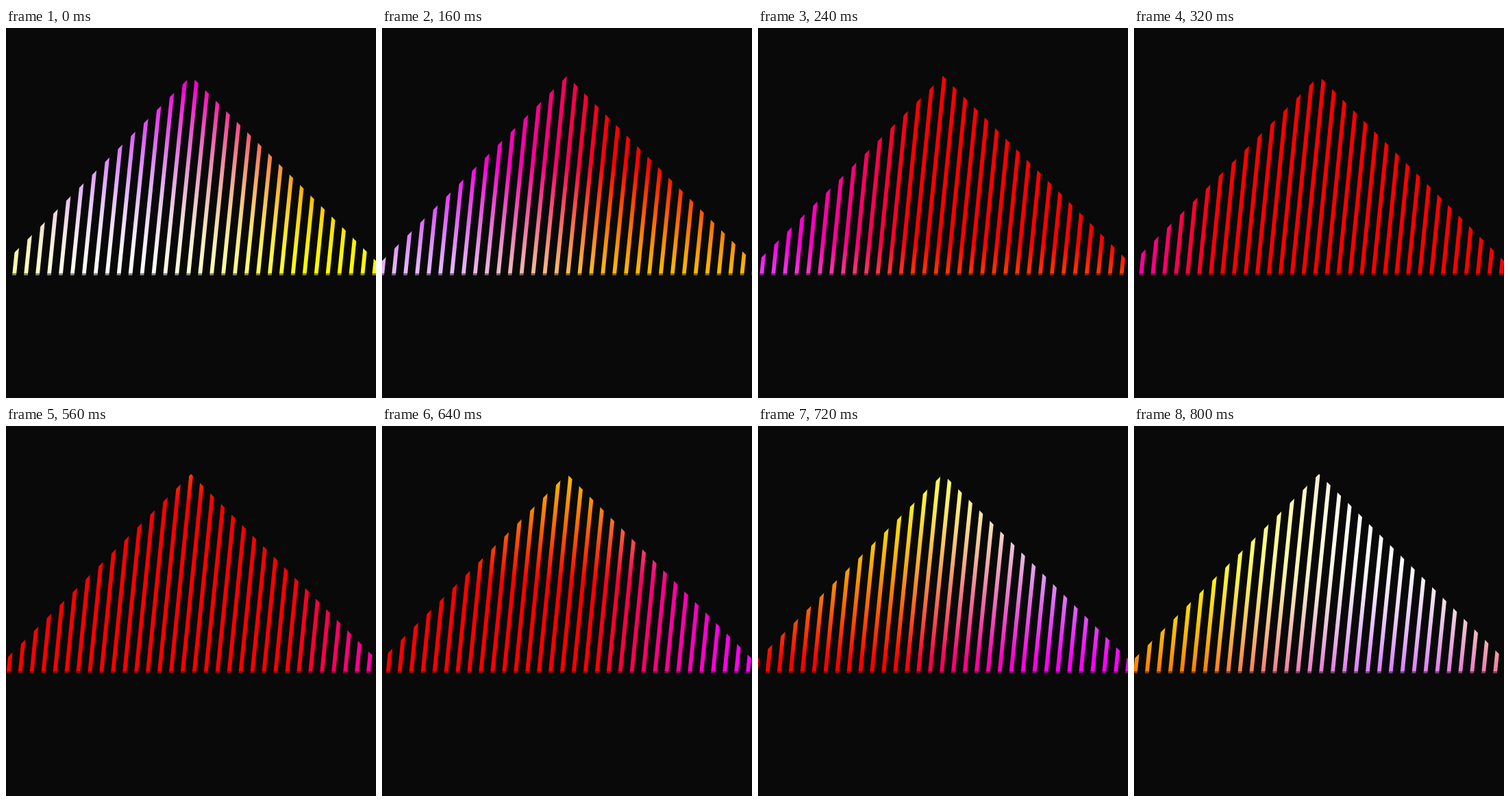
Recreate the animation shown at these times as an HTML page with a canvas. Size 540 by 540 pixels, loop 0.96 s.

```html
<!DOCTYPE html>
<html lang="en">
<head>
<meta charset="utf-8">
<title>Striped triangle</title>
<style>
  html, body { margin: 0; width: 100%; height: 100%; overflow: hidden; background: #090909; }
  canvas { display: block; width: 100vw; height: 100vh; }
</style>
</head>
<body>
<canvas id="stage" width="540" height="540"></canvas>
<script>
const SIZE = 540;
const LOOP = 960;
const TICK = 80;    // display interval, ms
const POSE = 100;   // time per pose, ms
const CYCLE = 10;   // poses in a full colour cycle

const APEX = { x: 270, y: 70 };
const BASE = 361;
const BAR = { gap: 16.94, width: 5.8, slant: 0.102, start: 12 };

const ctx = document.getElementById('stage').getContext('2d');

function makeLayer() {
  const layer = document.createElement('canvas');
  layer.width = layer.height = SIZE;
  return layer.getContext('2d');
}
const bars = makeLayer();
const colour = makeLayer();
const pixels = colour.createImageData(SIZE, SIZE);

// Clipped cosine, 0 to 1
function wave(pos, peak, length) {
  const v = 17 + 240 * Math.cos(2 * Math.PI * (pos - peak) / length);
  return Math.min(1, Math.max(0, v / 255));
}

// Green travels down, blue travels left
function paintColour(pose) {
  const greenPeak = 385 + 1150 * pose / CYCLE;
  const bluePeak = 162 - 1050 * pose / CYCLE;
  const blues = Array.from({ length: SIZE }, (_, x) => wave(x, bluePeak, 1050));
  const data = pixels.data;
  for (let y = APEX.y; y < BASE; y++) {
    const g = wave(y, greenPeak, 1150);
    for (let x = 0; x < SIZE; x++) {
      const b = blues[x];
      const i = (y * SIZE + x) * 4;
      data[i] = 255 - 130 * g * (1 - g) * b * b;
      data[i + 1] = 255 * g;
      data[i + 2] = 255 * b;
      data[i + 3] = 255;
    }
  }
  colour.putImageData(pixels, 0, 0);
}

function paintBars(pose) {
  const h = BASE - APEX.y;
  const lean = BAR.slant * h;
  const half = BAR.width / 2;
  const shift = BAR.start + 0.3 * BAR.gap * pose;

  bars.clearRect(0, 0, SIZE, SIZE);
  bars.save();
  bars.beginPath();
  bars.moveTo(APEX.x, APEX.y);
  bars.lineTo(APEX.x + h, BASE);
  bars.lineTo(APEX.x - h, BASE);
  bars.clip();

  bars.beginPath();
  for (let x = shift % BAR.gap - 4 * BAR.gap; x < SIZE + BAR.gap; x += BAR.gap) {
    bars.moveTo(x - half, BASE);
    bars.lineTo(x - half + lean, APEX.y);
    bars.lineTo(x + half + lean, APEX.y);
    bars.lineTo(x + half, BASE);
    bars.closePath();
  }
  bars.fill();
  bars.restore();

  bars.globalCompositeOperation = 'source-in';
  bars.drawImage(colour.canvas, 0, 0);
  bars.globalCompositeOperation = 'source-over';
}

function draw(pose) {
  paintColour(pose);
  paintBars(pose);
  ctx.fillStyle = '#090909';
  ctx.fillRect(0, 0, SIZE, SIZE);
  ctx.drawImage(bars.canvas, 0, 0);
  // Dim feet of the bars
  ctx.fillStyle = 'rgba(9, 9, 9, 0.5)';
  ctx.fillRect(0, BASE - 3, SIZE, 3);
}

let shown = -1;
function frame() {
  const t = performance.now() % LOOP;
  const pose = Math.floor(Math.floor(t / TICK) * TICK / POSE);
  if (pose !== shown) {
    draw(pose);
    shown = pose;
  }
  requestAnimationFrame(frame);
}
frame();
</script>
</body>
</html>
```
